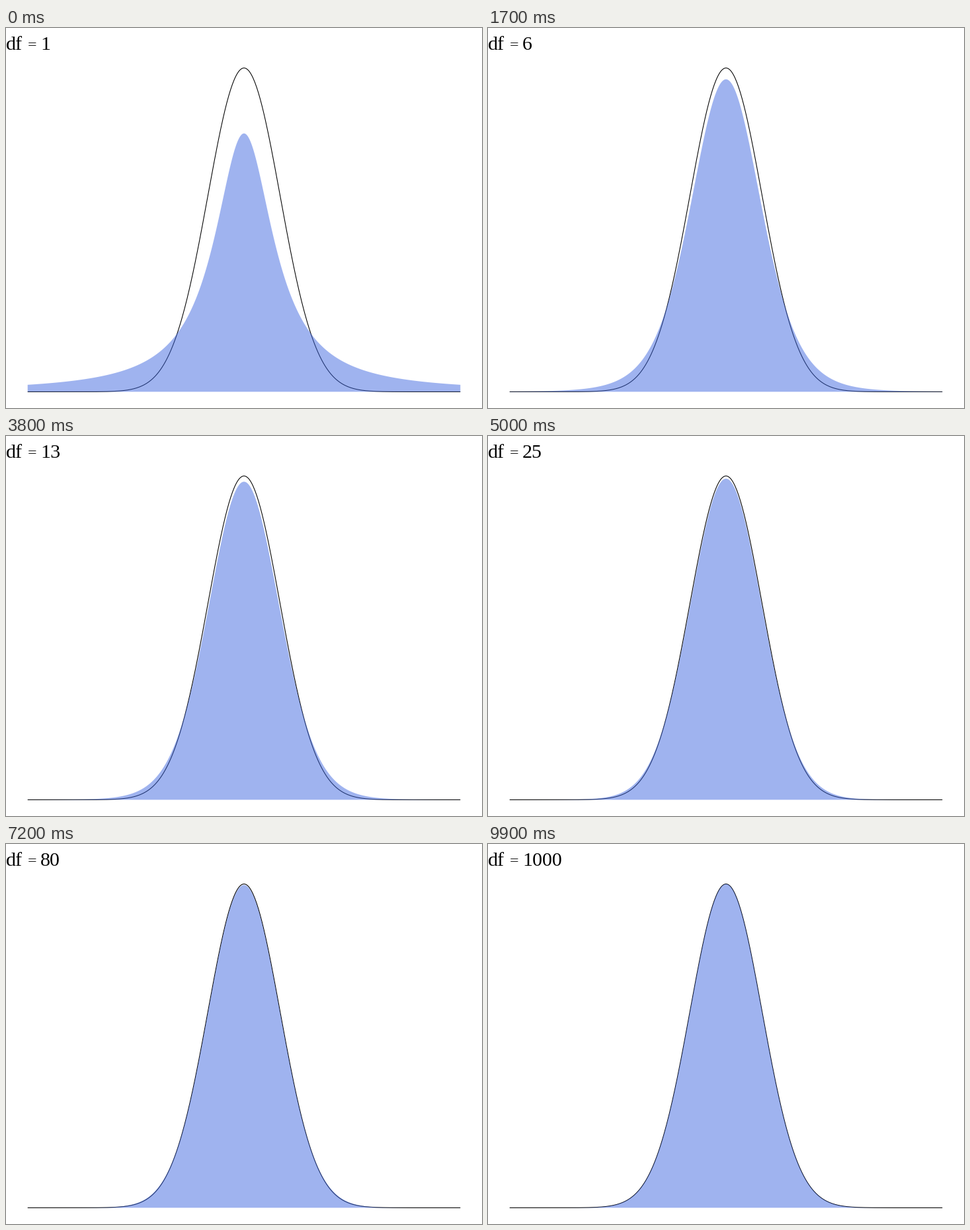
Write a matplotlib script that moves like this. It is 720x576 px and loops after 10000 ms.

```python
"""Student's t density approaching the normal curve as df grows."""
import math

import numpy as np
import matplotlib.pyplot as plt
from matplotlib.animation import FuncAnimation

W, H, DPI = 720, 576, 72
FRAMES, STEP = 100, 100  # 100 frames of 100 ms

X0, X1 = W / 22, W - W / 22  # 5 % margin on each side
BASE, PEAK = 551.4, 60.6
FONT = "Liberation Serif"

DFS = [*range(1, 15), *range(15, 51, 5), *range(60, 101, 10),
       *range(200, 1001, 100)]
SLOW = 28  # up to here a value takes three ticks, afterwards two

x = np.linspace(-6, 6, 481)
px = np.interp(x, [-6, 6], [X0, X1])
normal = np.exp(-x ** 2 / 2) / math.sqrt(2 * math.pi)


def to_y(density):
    return BASE - (BASE - PEAK) * density / normal.max()


def t_density(df):
    log_c = math.lgamma((df + 1) / 2) - math.lgamma(df / 2)
    return (math.exp(log_c) / math.sqrt(df * math.pi)
            * (1 + x ** 2 / df) ** (-(df + 1) / 2))


def value_at(tick):
    """Degrees of freedom reached at a tick."""
    if tick < 3 * SLOW + 3:
        k = min(tick // 3, SLOW)
    else:
        k = SLOW + (tick - 3 * SLOW - 1) // 2
    return DFS[min(k, len(DFS) - 1)]


def area_points(df):
    top = np.column_stack([px, to_y(t_density(df))])
    return np.vstack([[X0, BASE], top, [X1, BASE]])


fig = plt.figure(figsize=(W / DPI, H / DPI), dpi=DPI, facecolor="white")
ax = fig.add_axes([0, 0, 1, 1])
ax.set_xlim(0, W)
ax.set_ylim(H, 0)
ax.axis("off")

ax.plot(px, to_y(normal), color="black", lw=1.07, solid_capstyle="butt")
area, = ax.fill(*area_points(1).T, color="royalblue", alpha=0.5, lw=0,
                zorder=3)


def label(left, base, text, size):
    return ax.text(left, base, text, size=size, family=FONT, color="black",
                   ha="left", va="baseline")


label(0, 33, "df", 30)
label(32.3, 32, "=", 24)
number = label(52, 33, "1", 30)


def draw(i):
    # the area runs one tick ahead of the number
    area.set_xy(area_points(value_at(i + 1)))
    number.set_text(str(value_at(i)))
    return area, number


anim = FuncAnimation(fig, draw, frames=FRAMES, interval=STEP, repeat=True,
                     repeat_delay=0, blit=False)
plt.show()
```
